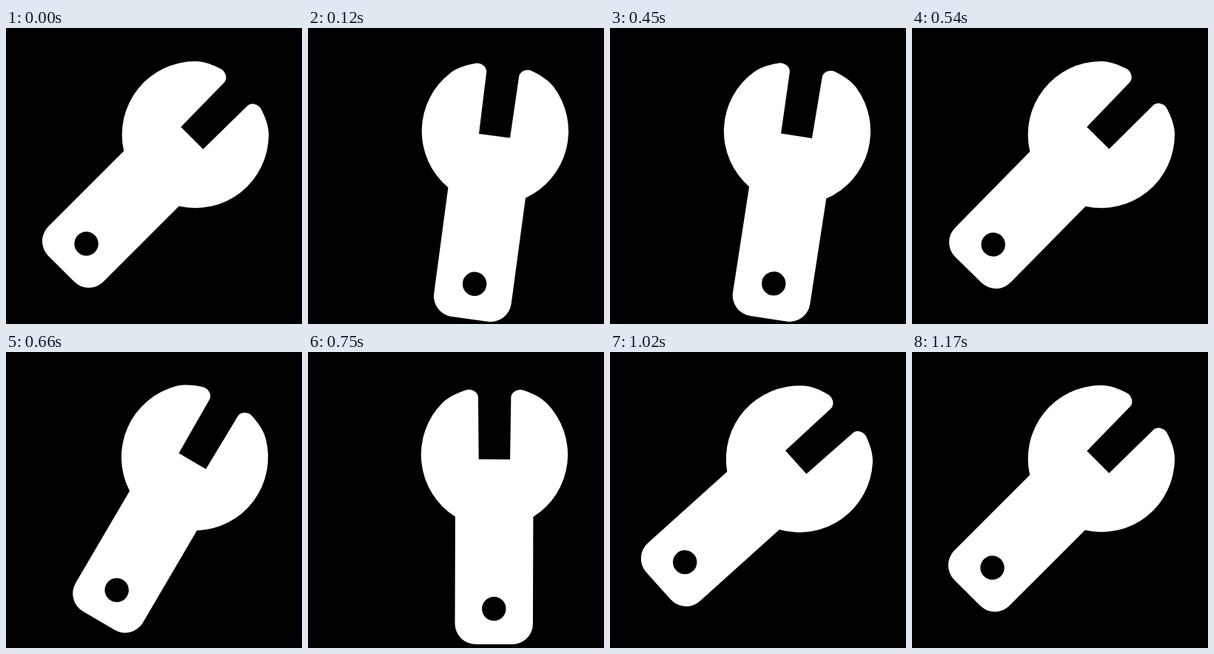
An HTML page that plays this animation: 400x400 px, repeating every 3230 ms.

```html
<!DOCTYPE html>
<html lang="en">
<head>
<meta charset="utf-8">
<title>Turning wrench</title>
<style>
  html, body { margin: 0; width: 100%; height: 100%; overflow: hidden; background: #000; }
  svg { display: block; width: 100%; height: 100%; }
</style>
</head>
<body>
<svg viewBox="0 0 400 400">
  <!-- Upright wrench drawn around the centre of its head; the pivot sits slightly off it. -->
  <g id="wrench">
    <g transform="translate(4.6 -7.7)">
      <path fill="#fff" d="M-70-70C-62-78-50-83.5-37-87.5C-30-88.5-22.2-84-22.2-77L-21.2 6.6H21.2L22.2-77
        C22.2-84 30-88.5 37-87.5C50-83.5 62-78 70-70A99.2 99.2 0 0 1 52.7 84.2V228.5
        a28 28 0 0 1-28 28H-24.7a28 28 0 0 1-28-28V84.2A99.2 99.2 0 0 1-70-70Z"/>
      <circle cy="208.5" r="16.2"/>
    </g>
  </g>
</svg>
<script>
  const LOOP = 3230, STEP = 30;
  const wrench = document.getElementById('wrench');

  // [time in ms, angle in degrees]
  const keys = [
    [0, 45], [200, 0], [367, 0], [567, 45], [767, 0],
    [900, 0], [1067, 51], [1167, 45], [LOOP, 45]
  ];

  // cubic-bezier(.833, 0, .167, 1), solved by bisection
  function ease(x) {
    let low = 0, high = 1;
    for (let i = 0; i < 24; i++) {
      const s = (low + high) / 2, r = 1 - s;
      const at = 3 * r * r * s * 0.833 + 3 * r * s * s * 0.167 + s ** 3;
      if (at < x) low = s; else high = s;
    }
    return low * low * (3 - 2 * low);
  }

  function angleAt(time) {
    const next = keys.findIndex(([end]) => time < end);
    const [t0, a0] = keys[next - 1], [t1, a1] = keys[next];
    return a0 + (a1 - a0) * ease((time - t0) / (t1 - t0));
  }

  function draw() {
    const time = performance.now() % LOOP;
    const angle = angleAt(Math.floor(time / STEP) * STEP);
    wrench.setAttribute('transform', `translate(247.3 146.2) rotate(${angle})`);
    requestAnimationFrame(draw);
  }
  draw();
</script>
</body>
</html>
```
